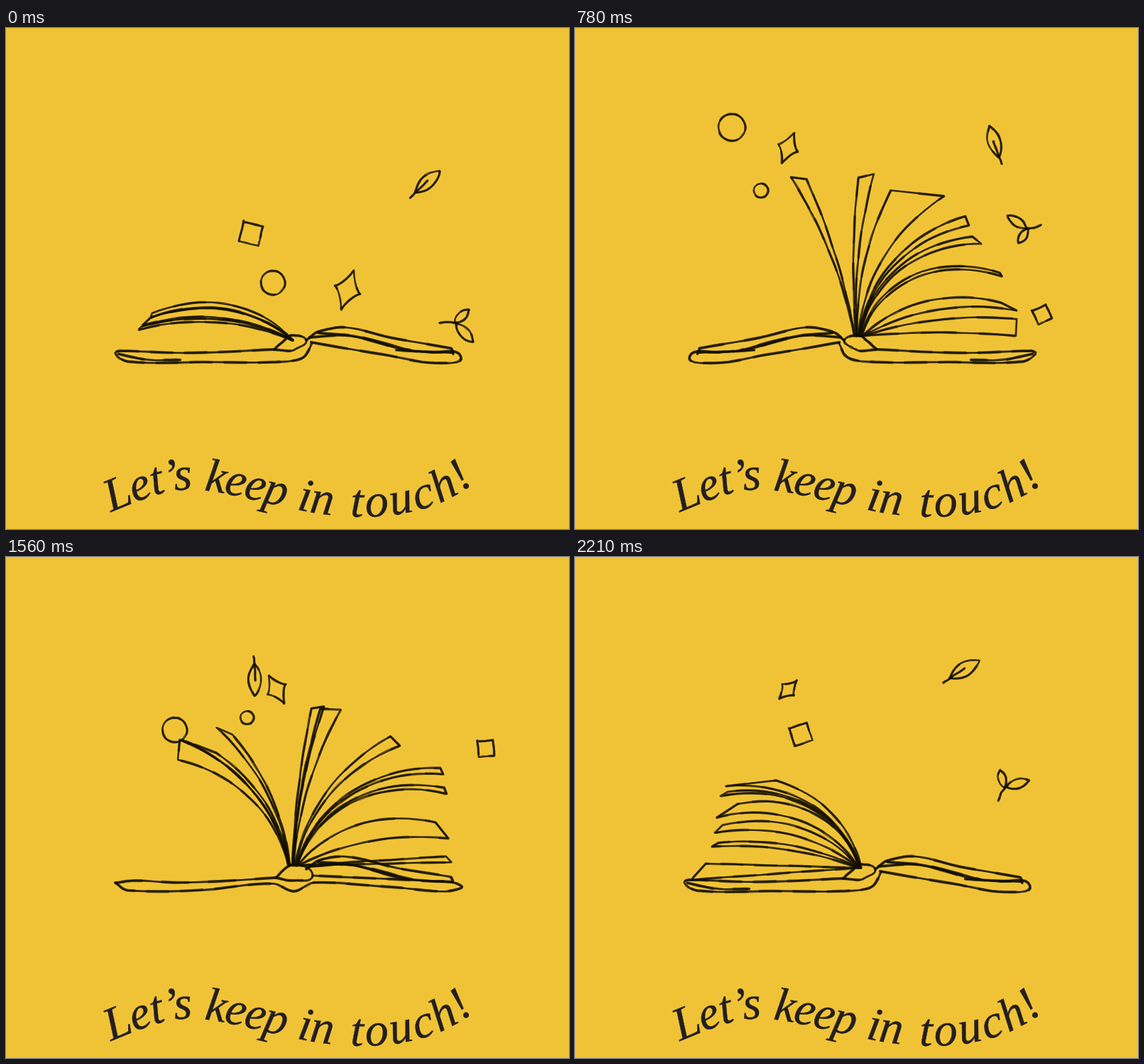
Animation, 793 px wide and 706 px high, one loop 2340 ms. Source, as an HTML page:

```html
<!DOCTYPE html>
<html lang="en">
<head>
<meta charset="utf-8">
<title>Let’s keep in touch!</title>
<style>
html, body { margin: 0; width: 100%; height: 100%; overflow: hidden; background: #f0c337; }
svg { display: block; width: 793px; height: 706px; }
.ink path { fill: none; stroke: #120e04; stroke-linecap: round; stroke-linejoin: round; }
text { font: italic 66px "Liberation Serif", "Times New Roman", serif; fill: #231f20; stroke: #231f20; stroke-width: .4px; }
</style>
</head>
<body>
<svg id="stage" viewBox="0 0 793 706">
  <defs>
    <path id="wave" d="M148 682C185 668 225 646 275 651S385 676 440 684S590 697 660 640L700 607"/>
  </defs>
  <text letter-spacing="-.8"><textPath href="#wave" startOffset="0">Let’s</textPath></text>
  <text letter-spacing="-1.6"><textPath href="#wave" startOffset="136">keep</textPath></text>
  <text letter-spacing="0"><textPath href="#wave" startOffset="269">in</textPath></text>
  <text letter-spacing="3.4"><textPath href="#wave" startOffset="346">touch!</textPath></text>
</svg>
<script>
const STEPS = 18, STEP = 130, AXIS = 802.5, RAD = Math.PI / 180;
const stage = document.getElementById('stage');
const lerp = (a, b, t) => a + (b - a) * t;
const mix = (a, b, t) => a.map((v, k) => lerp(v, b[k], t));
const range = (n, f) => Array.from({ length: n }, (_, k) => f(k));
const rows = text => text.split(',').map(r => r.trim().split(/\s+/).map(Number));

// Smooth line through key points; a comma marks a sharp corner
function curve(text) {
  const out = [];
  let last;
  for (const n of rows(text)) {
    const p = last ? [last] : [];
    for (let i = 0; i < n.length; i += 2) p.push([n[i], n[i + 1]]);
    last = p[p.length - 1];
    for (let i = 0; i < p.length - 1; i++) {
      const b = p[i], c = p[i + 1], len = Math.hypot(c[0] - b[0], c[1] - b[1]);
      const slope = (from, to) => {
        const d = [to[0] - from[0], to[1] - from[1]], k = len / Math.hypot(...d);
        return [d[0] * k, d[1] * k];
      };
      const u = slope(p[i - 1] || b, c), v = slope(b, p[i + 2] || c);
      for (let k = 0; k < 8; k++) {
        const t = k / 8, s = 1 - t;
        out.push([0, 1].map(m => b[m] * s * s * (1 + 2 * t) + c[m] * t * t * (3 - 2 * t) +
          u[m] * t * s * s - v[m] * t * t * s));
      }
    }
  }
  out.push(last);
  return out;
}

// Covers
const thinSide = [
  '423 440 440 428 478 422 550 438 627 451, 630 459',
  '428 436 485 434 560 453 628 458',
  '440 430 490 434 570 454'
];
const tilted = [
  '378 453 250 458 162 455 154 459 172 470 280 471 395 470 420 463 431 444',
  '158 459 195 467 245 468',
  '378 453 392 440 403 433 423 440 411 451 400 455 378 453',
  '430 443 530 460 605 472 641 463 600 457 550 454',
  ...thinSide
].map(curve);
const level = [
  '154 459 172 470 280 469 376 460 405 471 434 459 540 465 620 471 641 463 600 457 432 449',
  '154 459 185 456 250 459 380 452',
  '380 452 405 433 432 449 405 456 380 452',
  ...thinSide
].map(curve);
const tiltedBack = tilted.map(l => l.map(([x, y]) => [AXIS - x, y]));

// A pose lists the two tip corners of each page, left to right
function pose(hinge, bias, tips) {
  const polar = (x, y) => [Math.atan2(x - hinge[0], hinge[1] - y) / RAD, Math.hypot(x - hinge[0], y - hinge[1])];
  return { hinge, bias, pages: rows(tips).map(([a, b, c, d]) => [...polar(a, b), ...polar(c, d)]) };
}
const mirror = ({ hinge, bias, pages }) => ({
  hinge: [AXIS - hinge[0], hinge[1]],
  bias: -bias,
  pages: pages.map(([a, r, b, q]) => [-b, q, -a, r]).reverse()
});

const stack = pose([413, 440], -18, '187 425 190 421, 192 419 203 409, 204 408 206 402');
const landing = pose([408, 438], 0,
  '163 455 184 432, 193 408 202 403, 197 389 208 378, 200 367 229 348, 205 337 215 331, 213 323 283 315');
const fanOut = pose([406, 433], -7,
  `165 454 178 440, 180 403 215 407, 181 373 190 363, 179 347 192 336, 232 245 247 234,
   295 215 325 206, 418 198 443 213, 585 260 599 263, 625 266 641 272`);
const sweepRight = pose([396, 434], 5,
  `304 210 326 213, 399 211 421 206, 445 229 520 237, 550 265 555 278,
   560 294 572 304, 598 345 601 350, 600 387 622 398, 622 410 621 434`);
const fanBack = pose([407, 433], 0,
  `166 448 164 443, 164 443 235 411, 195 370 230 363, 323 214 333 212, 341 206 368 201,
   486 208 503 222, 609 253 609 262, 615 283 617 295, 606 360 630 391, 621 417 621 419`);
const sweepLeft = pose([405, 433], -5,
  `165 454 178 440, 181 410 210 403, 180 397 205 385, 201 349 230 332, 229 305 244 295,
   258 266 282 264, 308 237 345 235, 427 218 447 212, 482 213 497 211`);
const poses = {
  0: stack, 1: landing, 4: fanOut, 6: sweepRight, 8: mirror(landing), 9: mirror(stack),
  10: mirror(landing), 13: fanBack, 15: sweepLeft, 17: landing
};

function poseAt(i) {
  if (poses[i]) return poses[i];
  const keys = Object.keys(poses).map(Number), n = keys.findIndex(k => k > i);
  const from = poses[keys[n - 1]], to = poses[keys[n]], t = (i - keys[n - 1]) / (keys[n] - keys[n - 1]);
  const count = Math.max(from.pages.length, to.pages.length);
  const pick = (list, j) => list[Math.round(j * (list.length - 1) / (count - 1))];
  return {
    hinge: mix(from.hinge, to.hinge, t),
    bias: lerp(from.bias, to.bias, t),
    pages: range(count, j => mix(pick(from.pages, j), pick(to.pages, j), t))
  };
}

// Each page edge leaves the spine steeply and curls over; low pages lie straight
function pageLines({ hinge, bias, pages }) {
  const edge = (angle, radius) => {
    const loose = Math.min(1, Math.max(0, (86 - Math.abs(angle)) / 20));
    const curl = .7 * angle * loose + bias, root = angle / 9;
    return range(25, k => {
      const s = k / 24, a = (angle - curl * (1 - s)) * RAD;
      return [hinge[0] + root * (1 - s) + Math.sin(a) * radius * s, hinge[1] - Math.cos(a) * radius * s];
    });
  };
  return pages.map(([a, r, b, q]) => [...edge(a, r), ...edge(b, q).reverse()]);
}

// Loose shapes around their own origin
const ring = (from, sweep) => range(37, k => {
  const a = (from + sweep * k / 36) * RAD;
  return [Math.cos(a), Math.sin(a)];
});
const bow = v => Math.sign(v) * Math.abs(v) ** 2.5;
const lens = (x, y, length, width, turn) => range(33, k => {
  const a = k / 16 * Math.PI, u = length * (1 - Math.cos(a)) / 2, v = width * Math.sin(a) * Math.abs(Math.sin(a));
  const c = Math.cos(turn * RAD), s = Math.sin(turn * RAD);
  return [x + u * c - v * s, y + u * s + v * c];
});
const shapes = {
  ring: [ring(-80, 380)],
  crescent: [ring(-135, 245)],
  star: [ring(0, 360).map(([x, y]) => [.64 * bow(x), bow(y)])],
  square: [curve('-1 -1, 1 -1, 1 1, -1 1, -1 -1.1')],
  corner: [curve('23 -10, 0 0, 9 23, 17 22')],
  leaf: [lens(-18, 0, 46, 9, 0), curve('-28 1 -14 0 6 -1')],
  sprig: [curve('-21 0 -8 -1 3 2'), lens(0, 0, 27, 6, -40), lens(2, 2, 35, 7, 49)]
};

// Key places: step x y size turn
const tracks = [
  ['ring', '0 376 359 17, 4 184 295 18, 6 221 140 19, 10 305 283 18, 13 204 224 17, 14 240 150 17'],
  ['crescent', '15 293 91 18'],
  ['ring', '2 335 320 10, 4 244 225 13, 6 262 229 10, 10 411 127 12, 13 304 276 8, 15 173 288 9'],
  ['star', `0 481 369 29 18, 4 353 166 20 -41, 6 300 169 23 22, 10 353 198 24 -9,
            13 395 181 22 -39, 15 276 200 18 60, 17 300 187 18 44`],
  ['square', '0 345 290 14 13, 4 488 400 8 5, 6 658 404 10.5 -25, 10 612 288 10.5 13, 12 676 270 11 -5'],
  ['square', '17 318 250 13 -18'],
  ['corner', '13 632 250 1 0, 15 619 204 1 -32'],
  ['leaf', `0 590 220 1 -41, 4 571 242 1 -32, 6 592 165 1 -107, 10 489 110 1.08 -198,
            13 281 197 .95 -307, 15 346 173 1 -406, 17 544 161 1.07 -391`],
  ['sprig', '0 632 415 1 -2, 4 640 369 .9 58, 5 678 330 .9 110, 6 638 283 .9 164, 10 514 195 1 397, 11 470 190 1 430'],
  ['sprig', '15 464 176 1 119, 17 605 325 .95 295']
].map(([name, keys]) => [shapes[name], rows(keys)]);

function keyAt(keys, i) {
  const n = keys.findIndex(k => k[0] >= i);
  if (n < 0 || keys[0][0] > i) return null;
  const b = keys[n], a = keys[n - 1] || b;
  return mix(a, b, (i - a[0]) / (b[0] - a[0] || 1));
}

function place(lines, [, x, y, size, turn = 0]) {
  const c = Math.cos(turn * RAD) * size, s = Math.sin(turn * RAD) * size;
  return lines.map(l => l.map(([u, v]) => [x + u * c - v * s, y + u * s + v * c]));
}

// A pencil line: firm core, uneven pressure, faint second pass
function pencil(lines, weight) {
  return lines.map((line, n) => {
    const path = (amp, seed, width, opacity, dash = '') => {
      const d = line.map(([x, y], i) =>
        (x + amp * Math.sin(i * .83 + seed)).toFixed(1) + ' ' + (y + amp * Math.sin(i * .61 + seed * 2)).toFixed(1));
      return `<path d="M${d.join('L')}" stroke-width="${width * weight}" opacity="${opacity}" stroke-dasharray="${dash}"/>`;
    };
    return path(.3, n, 2.3, .82) +
      path(.3, n, 3.5, .55, `${30 + n * 7 % 30} ${18 + n * 11 % 31}`) +
      path(1.2, n + 2, 1.6, .45);
  }).join('');
}

for (let i = 0; i < STEPS; i++) {
  const cover = i < 3 || i > 14 ? tilted : i > 5 && i < 12 ? tiltedBack : level;
  const bits = tracks.flatMap(([shape, keys]) => {
    const key = keyAt(keys, i);
    return key ? place(shape, key) : [];
  });
  const g = document.createElementNS('http://www.w3.org/2000/svg', 'g');
  g.setAttribute('class', 'ink');
  g.innerHTML = pencil(cover, 1.15) + pencil(pageLines(poseAt(i)), 1) + pencil(bits, .95);
  stage.append(g);
  g.animate([
    { opacity: 1, offset: 0, easing: 'step-end' },
    { opacity: 0, offset: 1 / STEPS, easing: 'step-end' },
    { opacity: 0, offset: 1 }
  ], { duration: STEPS * STEP, iterations: Infinity, delay: (i - STEPS) * STEP });
}
</script>
</body>
</html>
```
